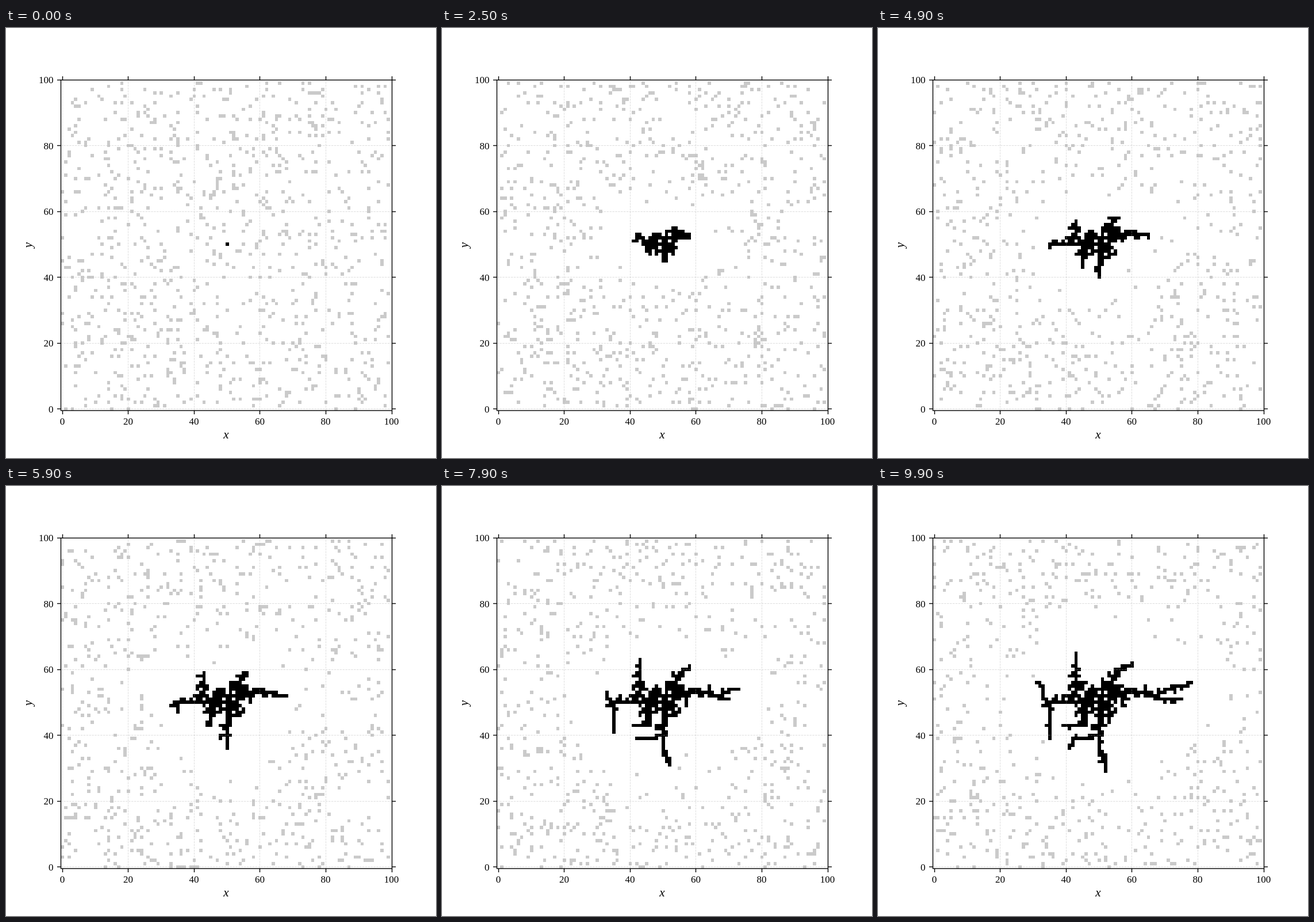
Write an HTML page with a canvas that moves like this. It is 748 px wide and 748 px high and loops after 10 s.

```html
<!DOCTYPE html>
<html lang="en">
<head>
<meta charset="utf-8">
<title>Diffusion-limited aggregation</title>
<style>
  html, body { margin: 0; width: 100%; height: 100%; overflow: hidden; background: #fff; }
  canvas { display: block; width: 748px; height: 748px; }
</style>
</head>
<body>
<canvas id="stage" width="748" height="748"></canvas>
<script>
const ctx = document.getElementById('stage').getContext('2d');
const SIZE = 100, FRAMES = 100, STEP_MS = 100;
const WALKERS = 900, HOPS = 10, FINAL_CELLS = 325;
const UNIT = 5.726;
const BOX = { left: 95.5, top: 90.5, right: 671.5, bottom: 665.5 };
const DIRS = [[1, 0], [-1, 0], [0, 1], [0, -1]];

const px = x => 98.4 + x * UNIT;
const py = y => 662.6 - y * UNIT;
const snap = v => Math.floor(v) + 0.5;

let seed = 20317;
function rand() {
  seed = (seed + 0x6D2B79F5) | 0;
  let t = Math.imul(seed ^ (seed >>> 15), 1 | seed);
  t = (t + Math.imul(t ^ (t >>> 7), 61 | t)) ^ t;
  return ((t ^ (t >>> 14)) >>> 0) / 4294967296;
}
const pick = n => Math.floor(rand() * n);
const key = (x, y) => y * SIZE + x;
const spot = k => [k % SIZE, Math.floor(k / SIZE)];

// Arms of the cluster: cells due at each frame
const due = Array.from({ length: FRAMES }, () => []);

// Random staircase from one node to the next, at an even pace
function reach(from, frame, x, y) {
  const total = Math.abs(x - from.x) + Math.abs(y - from.y);
  let cx = from.x, cy = from.y;
  for (let i = 1; i <= total; i++) {
    const dx = x - cx, dy = y - cy;
    if (rand() * (Math.abs(dx) + Math.abs(dy)) < Math.abs(dx)) cx += Math.sign(dx);
    else cy += Math.sign(dy);
    due[Math.ceil(from.frame + i / total * (frame - from.frame))].push(key(cx, cy));
  }
  return { frame, x, y };
}

const center = { frame: 0, x: 50, y: 50 };
due[0].push(key(center.x, center.y));

const hub = reach(center, 8, 45, 51);
const shoulder = reach(hub, 16, 43, 52);
const west = reach(shoulder, 49, 35, 49);
reach(west, 89, 35, 39);
reach(west, 99, 31, 56);
reach(shoulder, 89, 43, 65);
reach(reach(hub, 49, 45, 43), 89, 39, 43);

const fork = reach(center, 6, 52, 52);
const east = reach(reach(fork, 16, 55, 53), 49, 65, 52);
reach(east, 99, 75, 51);
reach(east, 99, 78, 56);
reach(reach(fork, 35, 54, 57), 89, 60, 62);

const south = reach(center, 49, 50, 40);
reach(south, 69, 51, 32);
reach(south, 89, 41, 36);

// Walkers roam; every new cluster cell takes in the nearest one.
function simulate() {
  const stuck = new Set();
  const walkers = Array.from({ length: WALKERS }, () => [pick(SIZE), pick(SIZE)]);
  const contacts = (x, y) => DIRS.filter(([dx, dy]) => stuck.has(key(x + dx, y + dy))).length;

  function hop(w) {
    const [dx, dy] = DIRS[pick(4)];
    const x = w[0] + dx, y = w[1] + dy;
    if (x < 0 || y < 0 || x >= SIZE || y >= SIZE) return;
    if (stuck.has(key(x, y)) || contacts(x, y)) return;
    w[0] = x;
    w[1] = y;
  }

  function attach(k) {
    if (stuck.has(k)) return;
    stuck.add(k);
    const [x, y] = spot(k);
    let best = 0, least = Infinity;
    walkers.forEach((w, i) => {
      const d = (w[0] - x) ** 2 + (w[1] - y) ** 2;
      if (d < least) { least = d; best = i; }
    });
    walkers.splice(best, 1);
  }

  // Side twigs keep the cluster growing at a steady rate.
  function sprout(goal) {
    while (stuck.size < goal) {
      const [x, y] = spot([...stuck][pick(stuck.size)]);
      const [dx, dy] = DIRS[pick(4)];
      if (contacts(x + dx, y + dy) <= 2) attach(key(x + dx, y + dy));
    }
  }

  return due.map((cells, frame) => {
    if (frame) {
      for (let n = 0; n < HOPS; n++) walkers.forEach(hop);
    }
    cells.forEach(attach);
    sprout(1 + (FINAL_CELLS - 1) * frame / (FRAMES - 1));
    return { free: walkers.map(w => [...w]), stuck: [...stuck].map(spot) };
  });
}
const history = simulate();

function cell([x, y]) {
  const l = Math.round(px(x - 0.5)), r = Math.round(px(x + 0.5));
  const t = Math.round(py(y + 0.5)), b = Math.round(py(y - 0.5));
  ctx.fillRect(l, t, r - l, b - t);
}

function line(x1, y1, x2, y2) {
  ctx.beginPath();
  ctx.moveTo(x1, y1);
  ctx.lineTo(x2, y2);
  ctx.stroke();
}

function drawGrid() {
  ctx.strokeStyle = 'rgba(176,176,176,0.42)';
  ctx.lineWidth = 1;
  ctx.setLineDash([3.4, 1.5]);
  for (let v = 0; v < 100; v += 20) {
    const x = snap(px(v)), y = snap(py(v));
    line(x, BOX.bottom, x, BOX.top);
    line(BOX.left, y, BOX.right, y);
  }
  ctx.setLineDash([]);
}

function drawAxes() {
  const { left, top, right, bottom } = BOX;
  ctx.strokeStyle = ctx.fillStyle = '#000';
  ctx.lineWidth = 1.4;
  ctx.strokeRect(left, top, right - left, bottom - top);
  ctx.font = '17px "Liberation Serif", serif';
  for (let v = 0; v <= 100; v += 20) {
    const x = snap(px(v)), y = snap(py(v));
    line(x, top, x, top - 6.5);
    line(x, bottom, x, bottom + 6.5);
    line(left, y, left - 6.5, y);
    line(right, y, right + 6.5, y);
    ctx.textAlign = 'center';
    ctx.fillText(v, px(v) - 0.5, 690);
    ctx.textAlign = 'right';
    ctx.fillText(v, 82.5, py(v) + 6);
  }
  ctx.font = 'italic 21px "Liberation Serif", serif';
  ctx.textAlign = 'center';
  ctx.fillText('x', 383, 714);
  ctx.save();
  ctx.translate(45, 377.5);
  ctx.rotate(-Math.PI / 2);
  ctx.fillText('y', 0, 0);
  ctx.restore();
}

function draw(frame) {
  const { free, stuck } = history[frame];
  ctx.fillStyle = '#fff';
  ctx.fillRect(0, 0, 748, 748);
  ctx.fillStyle = '#cacaca';
  free.forEach(cell);
  ctx.fillStyle = '#000';
  stuck.forEach(cell);
  drawGrid();
  drawAxes();
}

const start = performance.now();
let shown = -1;
function tick() {
  const frame = Math.floor((performance.now() - start) / STEP_MS) % FRAMES;
  if (frame !== shown) draw(shown = frame);
  requestAnimationFrame(tick);
}
tick();
</script>
</body>
</html>
```
